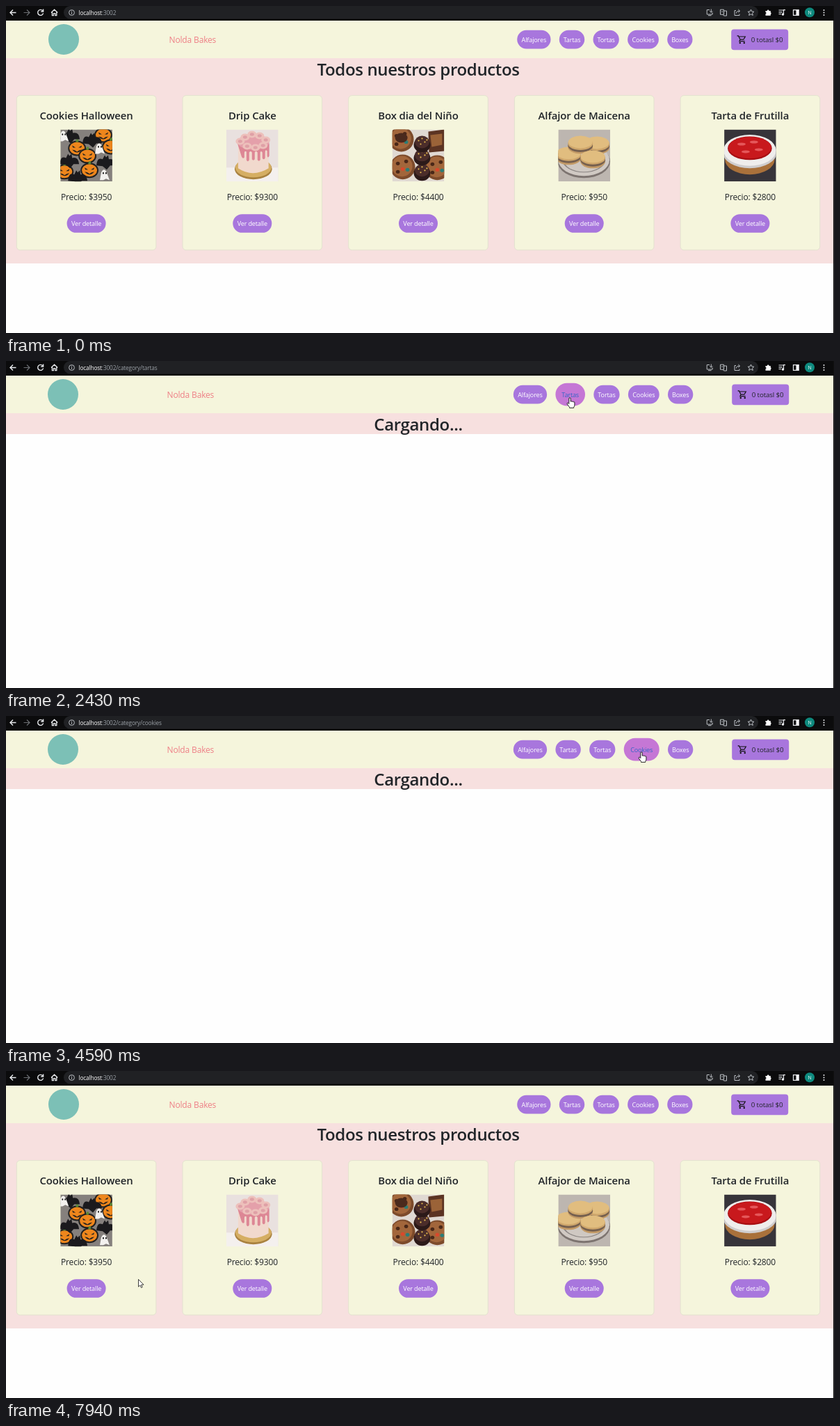
These frames come from a looping animation (1191x470 px, 8 s). An HTML page:

```html
<!DOCTYPE html>
<html lang="es">
<head>
<meta charset="utf-8">
<title>Nolda Bakes</title>
<style>
  html, body { margin: 0; width: 100%; height: 100%; overflow: hidden; background: #fefefe; }
  svg { display: block; }
  #stage { width: 1191px; height: 470px; font-family: "Open Sans", "Noto Sans", sans-serif; letter-spacing: -.01em; }
  text { fill: #212529; white-space: pre; }
  .mid { text-anchor: middle; }
  .heading { font-size: 24px; font-weight: 600; letter-spacing: -.014em; }
  .name { font-size: 14.9px; font-weight: 600; letter-spacing: -.006em; }
  .price { font-size: 12px; }
  .label { font-size: 9.1px; fill: #fff; }
  .total { font-size: 9.8px; }
  .brand { font-size: 12px; fill: #ee7f86; }
  .url { font-size: 8.3px; fill: #9aa0a6; }
  .hover { fill: #3565c6; }
  .pill { fill: #a876dd; }
  .active { fill: #c577d5; }
  .card { fill: #f5f5dc; stroke: #e3e2cf; }
  .icons { fill: none; stroke: #e8eaed; stroke-width: 1.2; }
</style>
</head>
<body>
<svg id="stage" viewBox="0 0 1191 470">
  <defs id="pictures"></defs>
  <rect width="1191" height="470" fill="#fefefe"/>
  <rect width="1191" height="21" fill="#0b0b0c"/>
  <rect x="83" y="0" width="999" height="18.5" rx="9.2" fill="#202124"/>
  <g class="icons">
    <path d="M14.5 9.5H6.5M10 5.5l-4 4 4 4" stroke-width="1.4"/>
    <path d="M25.5 9.5h8M30 5.5l4 4-4 4" stroke="#6b6e72"/>
    <path d="M52.8 6.8a4 4 0 1 0 .8 3.6M53.6 4.6v3.4h-3.4" stroke-width="1.4"/>
    <path d="M65 9.5l4.6-4.3 4.6 4.3M66.4 8.7v5h2v-3h2.4v3h2v-5" stroke-width="1.3"/>
    <circle cx="94.5" cy="9.5" r="3.9" stroke="#bdc1c6" stroke-width="1"/>
    <path d="M94.5 8.8v2.8M94.5 6.9v1" stroke="#bdc1c6" stroke-width="1"/>
    <g stroke="#bdc1c6" stroke-width="1">
      <path d="M1012 5.5h-3.8v6.5h8V9.5M1010 13.7h4.5M1014.3 4.5v4.5M1012.3 7.3l2 2 2-2"/>
      <path d="M1027.5 5.2h5v7h-5zM1032.5 7h4v7h-4l-1.5-1.8M1029 8.2h2.2"/>
      <path d="M1050 6.5h-2v7h7v-2M1050.5 10.5c0-2.5 1.5-3.3 4.5-3.3M1053.3 5l2.4 2.2-2.4 2.2"/>
      <path d="M1071.5 5l1.3 2.9 3.1.3-2.3 2.1.7 3.1-2.8-1.6-2.8 1.6.7-3.1-2.3-2.1 3.1-.3z"/>
    </g>
    <path d="M1092.5 7h2.3a1.4 1.4 0 0 1 2.8 0h2.2v2.3a1.4 1.4 0 0 1 0 2.6v1.8h-7.3v-2.2a1.4 1.4 0 0 0 0-2.7z" fill="#fff" stroke="none"/>
    <path d="M1111.5 6h7M1111.5 8.8h5M1111.5 11.5h3.5M1118.5 12V5.7h2.5"/>
    <circle cx="1117.5" cy="12" r="1.2" fill="#fff"/>
    <path d="M1132.5 5.7h7.5v7.6h-7.5z"/>
    <path d="M1137 5.7h3v7.6h-3z" fill="#fff"/>
  </g>
  <circle cx="1156" cy="9.3" r="7" fill="#0e8a7e"/>
  <text class="mid" x="1156" y="12" style="font-size:7px;fill:#fff">N</text>
  <g fill="#e8eaed"><circle cx="1176.5" cy="6" r="1"/><circle cx="1176.5" cy="9.5" r="1"/><circle cx="1176.5" cy="13" r="1"/></g>
  <rect y="21" width="1190" height="54" fill="#f5f5dc"/>
  <g id="view"></g>
  <rect x="1190" width="1" height="470" fill="#111"/>
  <g id="pointer">
    <circle id="click" cy="1.5" r="6.5" fill="#f7e733" opacity=".75"/>
    <path id="hand" fill="#fff" stroke="#111" stroke-width=".9" stroke-linejoin="round"
      d="M-1.2 7.5V1a1.2 1.2 0 0 1 2.4 0v4.2q1.1-.9 2.1.2 1.1-.7 1.9.4 1.5-.6 1.7 1v3.3q0 2-1.2 3.2v1.1H-.5v-1L-3.7 9q-.8-1.4.4-1.8 1-.2 2.1 1.4z"/>
    <path id="arrow" fill="#fff" stroke="#111" stroke-width=".8" stroke-linejoin="round"
      d="M0 0v10.6l2.4-2.2 1.6 3.5 1.7-.7-1.6-3.5h3.4z"/>
  </g>
</svg>
<script>
const LOOP = 8000;
const byId = id => document.getElementById(id);

const products = [
  ['Cookies Halloween', 3950],
  ['Drip Cake', 9300],
  ['Box dia del Niño', 4400],
  ['Alfajor de Maicena', 950],
  ['Tarta de Frutilla', 2800]
];
// label, pill width, product shown
const categories = [
  ['Alfajores', 48.3, 3], ['Tartas', 36.4, 4], ['Tortas', 37.3, 1],
  ['Cookies', 44.8, 0], ['Boxes', 36.3, 2]
];
// start, category (-1 = home), loading
const states = [
  [0, -1, 0], [1320, 0, 1], [1470, 0, 0], [2430, 1, 1], [2560, 1, 0],
  [3370, 2, 1], [3640, 2, 0], [4590, 3, 1], [4730, 3, 0],
  [5790, 4, 1], [6000, 4, 0], [7030, -1, 1], [7230, -1, 0]
];
// start, end, steps, target x, target y
const moves = [
  [70, 840, 12, 760, 67], [910, 1120, 4, 763, 53], [1540, 2090, 8, 811, 53],
  [2760, 3170, 7, 866, 51], [3900, 4240, 6, 914, 52], [5190, 5590, 6, 964, 51],
  [6070, 6760, 11, 292, 49], [7300, 7940, 10, 190.5, 299.5]
];
const clicks = [[1190, 1320], [2290, 2430], [3310, 3370], [4460, 4590], [5590, 5790], [6830, 7030]];

const rect = (x, y, w, h, r, cls) => `<rect x="${x}" y="${y}" width="${w}" height="${h}" rx="${r}" class="${cls}"/>`;
const text = (x, y, cls, s) => `<text x="${x}" y="${y}" class="${cls}">${s}</text>`;
const oval = (x, y, rx, ry, fill) => `<ellipse cx="${x}" cy="${y}" rx="${rx}" ry="${ry}" fill="${fill}"/>`;
const shape = (d, fill) => `<path d="${d}" fill="${fill}"/>`;
const each = (points, draw) => points.map(p => draw(...p)).join('');

function pictures() {
  const ground = fill => `<rect width="75" height="75" fill="${fill}"/>`;
  const pumpkin = (x, y) => oval(x, y, 13, 11, '#22201f') + oval(x, y, 11, 9, '#ee861c') +
    shape(`M${x - 7} ${y - 4}l5 3h-4zM${x + 7} ${y - 4}l-5 3h4zM${x - 7} ${y + 2}q7 8 14 0l-4 1-3 2-3-2z`, '#22201f') +
    shape(`M${x - 2} ${y - 9}l1-4h3v4z`, '#5d8a35');
  const bat = (x, y) => shape(`M${x - 14} ${y + 6}q1-13 9-9l3-6 2 3 3-3 1 6q9-2 10 9l-8 0-5 6-6-5z`, '#1b1a1d');
  const ghost = (x, y) => shape(`M${x - 6} ${y + 8}l2-11q4-8 8 0l4 11-5-2-4 2z`, '#f3f1ef') +
    oval(x - 1, y - 2, 1, 1.4, '#222') + oval(x + 3, y - 2, 1, 1.4, '#222');
  const cookie = (x, y) => oval(x, y, 18, 18, '#7d4b2b') + oval(x - 1, y - 1, 15, 15, '#a2663b') +
    each([[-7, -5, '#4a2818'], [5, -8, '#4a2818'], [0, 3, '#d9482c'], [7, 4, '#2b7d76'], [-7, 7, '#4a2818']],
      (dx, dy, c) => oval(x + dx, y + dy, 2.8, 2.6, c));
  const bonbon = y => oval(43, y + 4, 12, 11, '#2c1a19') + oval(43, y, 10.5, 9, '#4b2d2a') +
    each([[-5, -2], [0, -5], [4, 0], [-2, 3], [7, -3]], (dx, dy) => oval(43 + dx, y + dy, 1.1, 1.1, '#e8bd4f'));
  const alfajor = (x, y) => oval(x, y + 6, 18, 10, '#c39a66') + oval(x, y + 4, 18, 9.5, '#76604f') +
    oval(x, y + 1, 18, 9.5, '#cfa76c') + oval(x, y - 1, 17.5, 9, '#e1bd7f');

  const art = [
    ground('#85807d') +
      each([[62, 8], [24, 27], [73, 25], [39, 38], [6, 61], [42, 59]], pumpkin) +
      each([[14, 8], [46, 14], [13, 44], [66, 46], [25, 68]], bat) +
      each([[56, 27], [63, 65], [4, 9]], ghost),
    ground('#e9e1df') + shape('M0 55h75v20H0z', '#f4f0ee') +
      oval(39, 57, 27, 15, '#a98240') + oval(39, 55, 26, 14, '#d5ae63') +
      shape('M17 23v33q21 14 44 0V23z', '#f1d9cd') +
      shape('M16 20h46v18q-2 4-3 0v-7q-3-3-3 2v8q-2 4-4 0V33q-2-3-3 0v11q-2 3-4 0V33q-2-3-4 0v10q-2 3-4 0V33q-2-3-4 0v11q-2 4-4 0V32q-3-2-3 2v6q-2 3-4-1z', '#dd8795') +
      oval(39, 18, 23, 11, '#e4a0aa') +
      each([[20, 17], [27, 11], [37, 7], [48, 9], [57, 15], [53, 23], [42, 26], [30, 24]], (x, y) => oval(x, y, 6.5, 5, '#edc0bb') + oval(x, y, 3, 2.2, '#dfa0a6')),
    ground('#e0d9d2') + each([[13, 14], [15, 54], [65, 55]], cookie) +
      shape('M52 3l23-3v31l-22 2z', '#5c3423') + shape('M55 8l17-2v16l-15 3z', '#9b6338') +
      oval(13, 12, 9, 7, '#4a2a1d') + each([[59], [37], [18]], bonbon),
    ground('#bdb6b0') + oval(37, 46, 38, 24, '#7d7470') + oval(37, 44, 37, 23, '#d0c9c3') +
      oval(37, 44, 31, 18, '#8b8583') + oval(37, 44, 29, 17, '#cfc8c2') +
      each([[56, 20], [15, 35], [32, 19], [50, 40]], alfajor),
    ground('#37343a') + oval(37, 43, 36, 22, '#a9713b') +
      oval(37, 33, 39, 23, '#cfcdce') + oval(37, 30, 38, 22.5, '#efedec') +
      oval(37, 27, 32, 17, '#a80f14') + oval(37, 26, 31, 15.5, '#c8191d') +
      each([[25, 21], [43, 18], [50, 29], [31, 32]], (x, y) => oval(x, y, 6, 2, '#e5575a'))
  ];
  return art.map((a, i) => `<symbol id="pic${i}" viewBox="0 0 75 75">${a}</symbol>`).join('');
}

function card(id, x, width) {
  const [name, price] = products[id], mid = x + width / 2;
  return rect(x, 128.6, width, 222.2, 5, 'card') +
    text(mid, 163, 'name mid', name) +
    `<use href="#pic${id}" x="${mid - 37.3}" y="177.6" width="74.6" height="74.6"/>` +
    text(mid, 279, 'price mid', `Precio: $${price}`) +
    rect(mid - 28, 299.2, 56, 26.6, 13.3, 'pill') +
    text(mid, 316.3, 'label mid', 'Ver detalle');
}

function layout(active) {
  let x = active < 0 ? 735.2 : 729.8;
  return categories.map(([, width], i) => {
    const grow = i === active ? 3.1 : 0;
    const pill = { x, y: 34.8 - grow, w: width + 2 * grow, h: 26.6 + 2 * grow };
    x += pill.w + 12.3;
    return pill;
  });
}

function page(active, loading, pills, hovered) {
  const home = active < 0;
  const dx = home ? 1 : 0;
  const path = home ? '' : '/category/' + categories[active][0].toLowerCase();
  let out = `<text x="104.5" y="12.5" class="url"><tspan fill="#fff">localhost</tspan>:3002${path}</text>` +
    oval(82 + dx, 48, 22, 22, '#7cc0b6') +
    text(231.5 + 3 * dx, 53.3, 'brand' + (hovered === 'brand' ? ' hover' : ''), 'Nolda Bakes');

  pills.forEach(({ x, y, w, h }, i) => {
    out += rect(x, y, w, h, h / 2, 'pill' + (i === active ? ' active' : '')) +
      text(x + w / 2, 51.6, 'label mid' + (i === hovered ? ' hover' : ''), categories[i][0]);
  });

  out += rect(1044.2 - dx, 33.5, 82, 29.7, 4, 'pill') +
    `<g transform="translate(${1052 - dx} 41) scale(.6)" fill="none" stroke="#111" stroke-width="2">
      <path d="M1 3h3l4.5 9h8l4-7H5M8.5 12l-2 4h13"/><circle cx="8" cy="20" r="1"/><circle cx="18" cy="20" r="1"/></g>` +
    text(1072.8 - dx, 52, 'total', '0 totasl $0');

  out += `<rect y="75" width="1190" height="${loading ? 30 : 295}" fill="#f7e0df"/>`;
  const heading = loading ? 'Cargando...' : home ? 'Todos nuestros productos' : 'Productos filtrados por categoria';
  out += text(593, 100, 'heading mid', heading);
  if (!loading) {
    out += home ? products.map((_, i) => card(i, 15.3 + 238.7 * i, 200.6)).join('')
                : card(categories[active][2], 15.3, 247.6);
  }
  return out;
}

function pointerAt(t) {
  let x = 1143, y = 478;
  for (const [start, end, steps, tx, ty] of moves) {
    if (t < start) break;
    const p = Math.min(steps, 1 + Math.floor((t - start) / (end - start) * (steps - 1))) / steps;
    const k = p * p * (3 - 2 * p);
    x += (tx - x) * k;
    y += (ty - y) * k;
  }
  return [x, y];
}

const show = (id, on) => byId(id).setAttribute('visibility', on ? 'visible' : 'hidden');
const inside = (x, y, b) => x >= b.x && x <= b.x + b.w && y >= b.y && y <= b.y + b.h;
const began = performance.now();
let shown = '';

function render() {
  const t = (performance.now() - began) % LOOP;
  const [, active, loading] = states.filter(s => s[0] <= t).pop();
  const [x, y] = pointerAt(t);
  const pills = layout(active);
  let hovered = pills.findIndex(b => inside(x, y, b));
  if (inside(x, y, { x: 231, y: 42, w: 69, h: 15 })) hovered = 'brand';

  const key = [active, loading, hovered].join();
  if (key !== shown) {
    byId('view').innerHTML = page(active, loading, pills, hovered);
    shown = key;
  }
  const visible = t >= 70;
  byId('pointer').setAttribute('transform', `translate(${x} ${y})`);
  show('hand', visible && hovered !== -1);
  show('arrow', visible && hovered === -1);
  show('click', clicks.some(([a, b]) => t >= a && t < b));
  requestAnimationFrame(render);
}

byId('pictures').innerHTML = pictures();
render();
</script>
</body>
</html>
```
